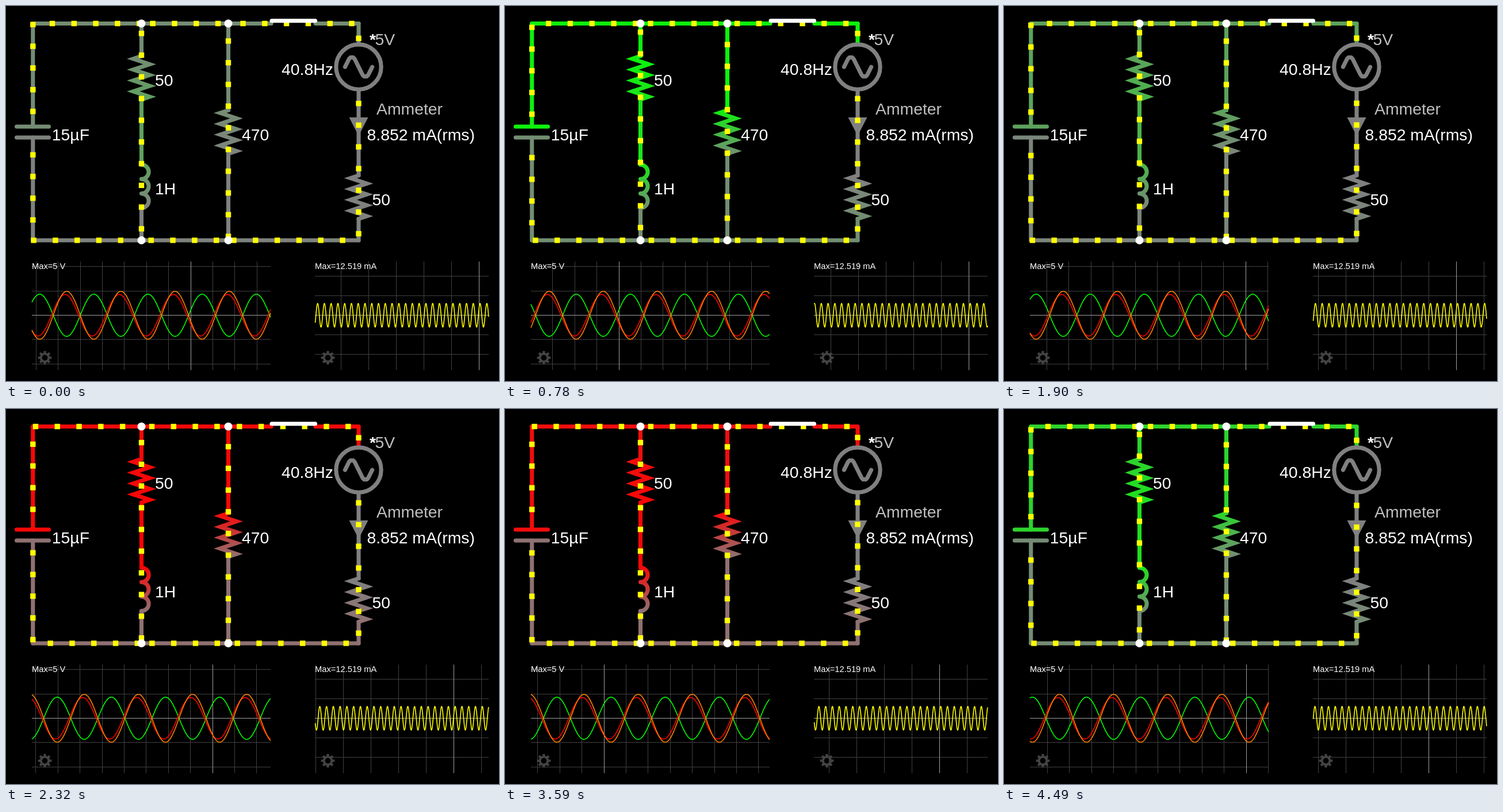
An HTML page with a canvas that plays this animation: 857x653 px, repeating every 4.56 s.

```html
<!DOCTYPE html>
<html lang="en">
<head>
<meta charset="utf-8">
<title>Resonant circuit</title>
<style>
  html, body { margin: 0; width: 100%; height: 100%; overflow: hidden; background: #000; }
  canvas, svg { position: absolute; left: 0; top: 0; width: 857px; height: 653px; }
  text { font: 28.35px "Liberation Sans", Arial, sans-serif; fill: #fff; white-space: pre; }
  .dim { fill: #c0c0c0; }
  .bold { font-weight: bold; }
  .small { font-size: 14.7px; }
</style>
</head>
<body>
<canvas id="stage" width="857" height="653"></canvas>
<svg viewBox="0 0 857 653">
  <text x="79.8" y="233.7">15µF</text>
  <text x="259.1" y="139.2">50</text>
  <text x="259.1" y="328.2">1H</text>
  <text x="410.1" y="233.7">470</text>
  <text x="479" y="120.4">40.8Hz</text>
  <text x="632" y="68" class="bold">*</text>
  <text x="641.5" y="68" class="dim">5V</text>
  <text x="644" y="189" class="dim">Ammeter</text>
  <text x="627.5" y="233.7">8.852 mA(rms)</text>
  <text x="636.6" y="347.1">50</text>
  <text x="45" y="457.5" class="small">Max=5 V</text>
  <text x="537" y="457.5" class="small">Max=12.519 mA</text>
</svg>
<script>
const ctx = document.getElementById("stage").getContext("2d");
const LOOP = 4560;
const X = [46.8, 235.5, 386.5, 613];   // columns of the circuit
const TOP = 30.5, BOTTOM = 408;
const UNIT = 37.8;                     // spacing of the current dots
const PERIOD = 94.118;                 // one cycle on the left scope
const GREY = "#808080";

// [ms, step] and [step, scroll in pixels]
const STEPS = [[0, 0], [70, 1], [580, 9], [650, 10], [780, 12], [2880, 42],
               [3380, 49], [3450, 50], [3930, 57], [4560, 66]];
const SCROLL = [[0, 0], [12, 123], [22, 224], [34, 346], [42, 430], [52, 533], [65, 668]];

function lerp(points, x) {
  let i = 1;
  while (i < points.length - 1 && x > points[i][0]) i++;
  const [x0, y0] = points[i - 1], [x1, y1] = points[i];
  return y0 + (y1 - y0) * (x - x0) / (x1 - x0);
}

const wave = deg => Math.cos(deg * Math.PI / 180);

// Grey at 0, green at +1, red at -1
function colour(v) {
  const a = Math.min(1, Math.abs(v));
  const strong = Math.round(128 + 127 * a), weak = Math.round(128 * (1 - a));
  return v >= 0 ? `rgb(${weak},${strong},${weak})` : `rgb(${strong},${weak},${weak})`;
}

function stroke(style, join = "round") {
  ctx.strokeStyle = style;
  ctx.lineWidth = 7.1;
  ctx.lineCap = "round";
  ctx.lineJoin = join;
  ctx.stroke();
}

function line(style, x0, y0, x1, y1) {
  ctx.beginPath();
  ctx.moveTo(x0, y0);
  ctx.lineTo(x1, y1);
  stroke(style);
}

function fade(y, from, to) {
  const g = ctx.createLinearGradient(0, y, 0, y + 2 * UNIT);
  g.addColorStop(0, from);
  g.addColorStop(1, to);
  return g;
}

function resistor(x, y, from, to) {
  const len = 2 * UNIT;
  ctx.beginPath();
  ctx.moveTo(x, y);
  for (let i = 0; i < 4; i++) {
    ctx.lineTo(x - 14.2, y + len * (1 + 4 * i) / 16);
    ctx.lineTo(x + 14.2, y + len * (3 + 4 * i) / 16);
  }
  ctx.lineTo(x, y + len);
  stroke(fade(y, from, to), "miter");
}

function inductor(x, y, from, to) {
  const r = UNIT / 3;
  ctx.beginPath();
  for (let i = 0; i < 3; i++) ctx.arc(x, y + r * (2 * i + 1), r, -Math.PI / 2, Math.PI / 2);
  stroke(fade(y, from, to));
}

function source(x, y) {
  const unit = UNIT / 16;
  ctx.beginPath();
  ctx.arc(x, y, 39.2, 0, 2 * Math.PI);
  stroke(GREY);
  ctx.beginPath();
  for (let i = -10; i <= 10; i++)
    ctx.lineTo(x + i * unit, y + unit * Math.trunc(7.6 * Math.sin(i * Math.PI / 10)));
  stroke(GREY);
}

// Dots on the lattice "phase + n * UNIT" between two ends of a wire
function dots(fixed, from, to, phase, vertical) {
  const h = 4.7;
  ctx.fillStyle = "#ff0";
  let p = from + (((phase - from) % UNIT) + UNIT) % UNIT;
  for (; p <= to; p += UNIT) {
    const [x, y] = vertical ? [fixed, p] : [p, fixed];
    ctx.fillRect(x - h, y - h, 2 * h, 2 * h);
  }
}

function circuit(theta) {
  const vTop = wave(theta), vLow = 0.125 * wave(theta + 1.5);
  const top = colour(vTop), low = colour(vLow);
  const mid = colour(vTop - 0.1676 * wave(theta - 79));
  const [a, b, c, d] = X;

  line(top, a, TOP, 461, TOP);
  line(top, 538, TOP, d, TOP);
  line(top, d, TOP, d, 67);
  line(low, a, BOTTOM, d, BOTTOM);

  line(top, a, TOP, a, 210);
  line(top, 18.5, 210, 74.5, 210);
  line(low, a, 229, a, BOTTOM);
  line(low, 18.5, 229, 74.5, 229);

  line(top, b, TOP, b, 87.2);
  line(mid, b, 162.8, b, 276.2);
  line(low, b, 351.8, b, BOTTOM);
  resistor(b, 87.2, top, mid);
  inductor(b, 276.2, mid, low);

  line(top, c, TOP, c, 181.5);
  line(low, c, 257.1, c, BOTTOM);
  resistor(c, 181.5, top, low);

  line(GREY, d, 148, d, 295);
  line(low, d, 370.6, d, BOTTOM);
  resistor(d, 295, GREY, low);
  source(d, 106.1);
  ctx.fillStyle = GREY;
  ctx.beginPath();
  ctx.moveTo(d - 16.5, 194);
  ctx.lineTo(d + 16.5, 194);
  ctx.lineTo(d, 226);
  ctx.fill();

  // Charge moved through each branch
  const main = wave(theta - 80), cap = 7.5 * wave(theta + 6), coil = 7.6 * wave(theta - 161);
  dots(TOP, a, b, 82 - cap);
  dots(TOP, b, c, 253.8 - 1.4 * main);
  dots(TOP, c, d, 595.8 - 5.4 * main);
  dots(BOTTOM, a, b, 84.4 + cap);
  dots(BOTTOM, b, c, 253.6 + 1.4 * main);
  dots(BOTTOM, c, d, 590.2 + 5.4 * main);
  dots(a, TOP, 210, 68.6 + cap, true);
  dots(a, 229, BOTTOM, 68.6 + cap, true);
  dots(b, TOP, BOTTOM, 50.9 + coil, true);
  dots(c, TOP, BOTTOM, 64.8 + 4 * main, true);
  dots(d, TOP, 66, 164.5 - 5.4 * main, true);
  dots(d, 148, BOTTOM, 164.5 - 5.4 * main, true);

  line("#fff", 462, 25.8, 537.5, 25.8);
  ctx.fillStyle = "#fff";
  for (const x of [b, c]) for (const y of [TOP, BOTTOM]) {
    ctx.beginPath();
    ctx.arc(x, y, 7, 0, 2 * Math.PI);
    ctx.fill();
  }
}

function gear(x, y) {
  ctx.strokeStyle = "#444";
  ctx.lineCap = "butt";
  ctx.lineWidth = 3.8;
  ctx.beginPath();
  ctx.arc(x, y, 6.8, 0, 2 * Math.PI);
  ctx.stroke();
  ctx.lineWidth = 4.2;
  ctx.beginPath();
  for (let i = 0; i < 8; i++) {
    const cos = Math.cos(i * Math.PI / 4), sin = Math.sin(i * Math.PI / 4);
    ctx.moveTo(x + 8 * cos, y + 8 * sin);
    ctx.lineTo(x + 11.8 * cos, y + 11.8 * sin);
  }
  ctx.stroke();
}

// Grid whose every tenth upright, counted from "bright", is a major line
function grid(x0, x1, bright, dx, dy) {
  for (const major of [false, true]) {
    ctx.fillStyle = major ? "#a0a0a0" : "#404040";
    for (let n = Math.ceil((x0 - bright) / dx); bright + n * dx < x1; n++)
      if ((n % 10 === 0) === major) ctx.fillRect(Math.floor(bright + n * dx), 445, 1, 189);
    for (let n = -2; n <= 2; n++)
      if ((n === 0) === major) ctx.fillRect(x0, Math.round(538 + n * dy), x1 - x0, 1);
  }
}

function trace(style, x0, x1, signal) {
  ctx.beginPath();
  for (let x = x0; x <= x1; x += 0.5) ctx.lineTo(x, 538.5 - signal(x));
  ctx.strokeStyle = style;
  ctx.lineWidth = 1.6;
  ctx.lineCap = "butt";
  ctx.lineJoin = "round";
  ctx.stroke();
}

function scopes(theta, scroll) {
  const left = x => theta + (x - 460) * 360 / PERIOD;
  const right = x => theta + (x - 839) * 360 * 8 / PERIOD;

  grid(45, 460, 321 - scroll, 38.4, 42.4);
  gear(67.5, 612.5);
  trace("#0f0", 45, 460, x => -36.7 * wave(left(x)));
  trace("#f00", 45, 460, x => 36.1 * wave(left(x) + 11));
  trace("#ff8000", 45, 460, x => 41.7 * wave(left(x)));

  grid(537, 839, 822 - scroll / 8, 48, 33.8);
  gear(559.5, 612.5);
  trace("#ff0", 537.5, 839, x => -20.7 * wave(right(x) + 1.5));
}

function draw(now) {
  const step = Math.floor(lerp(STEPS, now % LOOP) + 0.001);
  const scroll = lerp(SCROLL, step);
  const theta = (460 + scroll - 105.6) * 360 / PERIOD;
  ctx.fillStyle = "#000";
  ctx.fillRect(0, 0, 857, 653);
  circuit(theta);
  scopes(theta, scroll);
}

let start;
function tick(now) {
  start ??= now;
  draw(now - start);
  requestAnimationFrame(tick);
}
draw(0);
requestAnimationFrame(tick);
</script>
</body>
</html>
```
